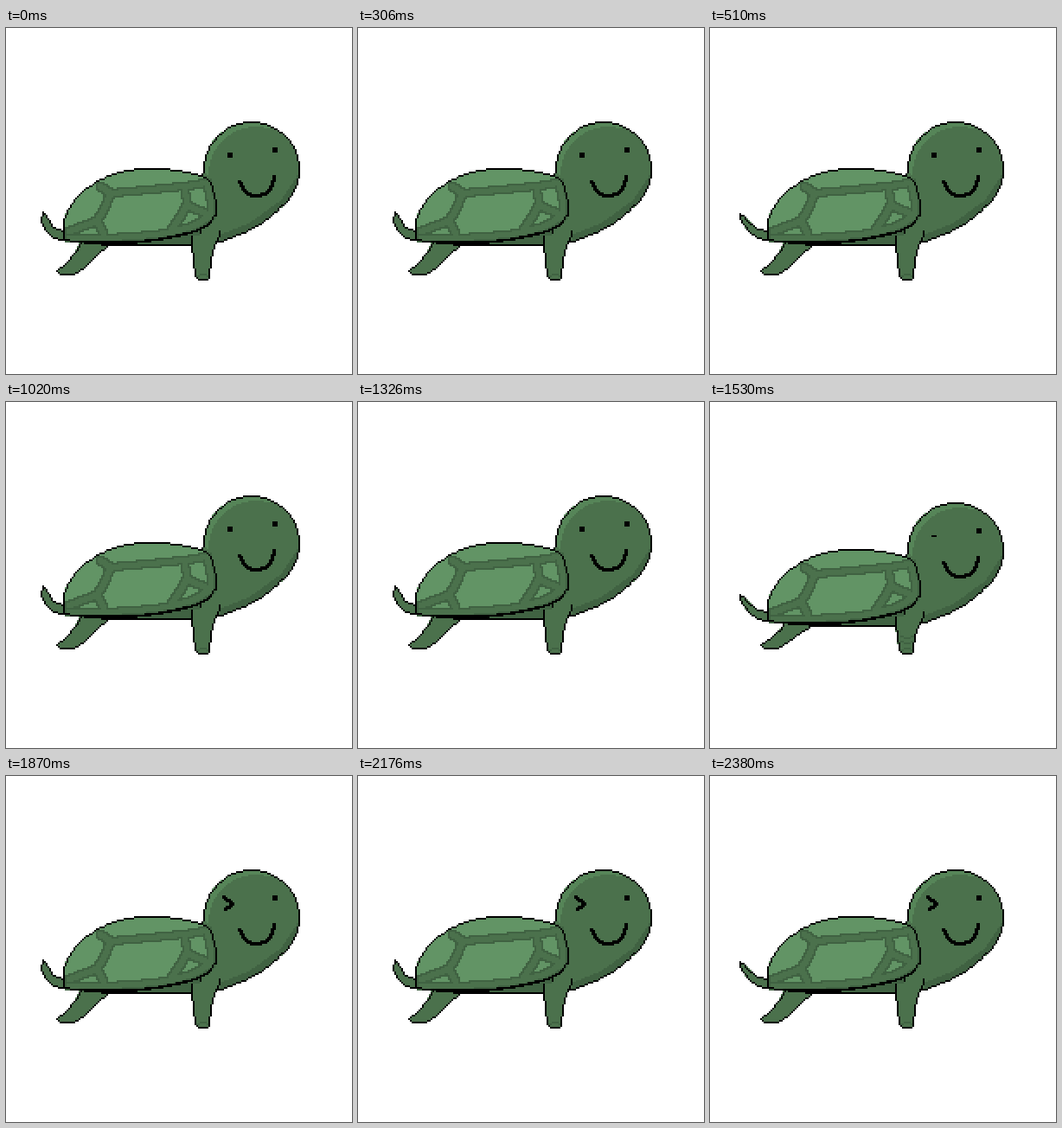
Animation of 400 by 400 pixels, one loop 2.89 s. Source, as an HTML page with a canvas:

```html
<!DOCTYPE html>
<html lang="en">
<head>
<meta charset="utf-8">
<title>Winking turtle</title>
<style>
  html, body { margin: 0; width: 100%; height: 100%; overflow: hidden; background: #fff; }
  canvas { display: block; width: 100vw; height: 100vh; image-rendering: pixelated; }
</style>
</head>
<body>
<canvas id="stage" width="200" height="200"></canvas>
<script>
const ctx = document.getElementById('stage').getContext('2d');
const INK = '#000', SKIN = '#4b714c', SHADE = '#406242', GLOW = '#568558', PLATE = '#629465';
const DROP = 4;

const pts = s => s.split(' ').map(p => p.split(',').map(Number));
const clamp = v => Math.max(0, Math.min(1, v));

function arc(cx, cy, r, from, to) {
  return Array.from({ length: 49 }, (_, i) => {
    const a = from + (to - from) * i / 48;
    return [cx + r * Math.cos(a), cy + r * Math.sin(a)];
  });
}

// Catmull-Rom through the points
function smooth(p, closed) {
  const n = p.length, out = [];
  const at = i => closed ? p[(i + n) % n] : p[Math.max(0, Math.min(n - 1, i))];
  for (let i = 0; i < (closed ? n : n - 1); i++) {
    const [a, b, c, d] = [at(i - 1), at(i), at(i + 1), at(i + 2)];
    for (let t = 0; t < 1; t += 0.125) {
      out.push([0, 1].map(k => b[k] + 0.5 * t * (c[k] - a[k] +
        t * (2 * a[k] - 5 * b[k] + 4 * c[k] - d[k] + t * (3 * (b[k] - c[k]) + d[k] - a[k])))));
    }
  }
  if (!closed) out.push(p[n - 1]);
  return out;
}

function fill(p, color) {
  ctx.fillStyle = color;
  const ys = p.map(q => q[1]);
  for (let y = Math.floor(Math.min(...ys)); y <= Math.max(...ys); y++) {
    const xs = [];
    p.forEach(([x1, y1], i) => {
      const [x2, y2] = p[(i + 1) % p.length], row = y + 0.01;
      if ((y1 <= row) !== (y2 <= row)) xs.push(x1 + (row - y1) * (x2 - x1) / (y2 - y1));
    });
    xs.sort((a, b) => a - b);
    for (let i = 0; i + 1 < xs.length; i += 2) {
      const l = Math.round(xs[i]), r = Math.round(xs[i + 1]);
      ctx.fillRect(l, y, r - l + 1, 1);
    }
  }
}

// Square-brush line without doubled corners
function stroke(p, color = INK, size = 1) {
  const cells = [], inset = (size - 1) >> 1;
  for (let i = 0; i + 1 < p.length; i++) {
    const [[x1, y1], [x2, y2]] = [p[i], p[i + 1]];
    const n = Math.max(1, Math.ceil(Math.max(Math.abs(x2 - x1), Math.abs(y2 - y1))));
    for (let k = 0; k <= n; k++) {
      const c = [Math.round(x1 + (x2 - x1) * k / n), Math.round(y1 + (y2 - y1) * k / n)];
      const last = cells[cells.length - 1], prev = cells[cells.length - 2];
      if (last && last[0] === c[0] && last[1] === c[1]) continue;
      if (prev && Math.abs(prev[0] - c[0]) === 1 && Math.abs(prev[1] - c[1]) === 1) cells.pop();
      cells.push(c);
    }
  }
  ctx.fillStyle = color;
  for (const [x, y] of cells) ctx.fillRect(x - inset, y - inset, size, size);
}

const outline = p => stroke([...p, p[0]]);

function shape(p, color) {
  fill(p, color);
  outline(p);
}

const NECK = pts('148,112 138,117.5 124,123');
const HEAD = [...arc(141.5, 81.5, 27.5, Math.PI, Math.PI * 2.26), ...NECK, ...pts('112,123 112,90')];
const HEAD_GLOW = [...arc(141.5, 81.5, 27.5, Math.PI, Math.PI * 1.6),
                   ...arc(144, 84.5, 28, Math.PI * 1.6, Math.PI)];
const NECK_SHADE = [...arc(141.5, 81.5, 27.5, 0.1, Math.PI * 0.26), ...NECK, ...pts('124,119 141,112 159,99')];
const SHELL = smooth(pts('33,119 34,108 42,96 55,87 70,82 90,81 112,85 118,90 121,104 117,112 104,118 75,123 45,123 34,122'), true);
const BANDS = [
  '54,91 60,95 82,93 103,91 116,89',
  '60,95 56,105 52,111 36,117',
  '52,111 56,119',
  '103,91 104,102 100,109 94,118',
  '104,102 118,108',
  '36,121 56,121 75,120 94,118 108,114 118,108 118,100 116,90'
].map(pts);
const BELLY = pts('55,120 60,125 107,125 120,124 120,112');
const TAIL = pts('21,106 24,110 27,115 33,117 33,122 27,121 22,116 20,111');
const BACK_LEG = pts('43,123 40,129 34,136 29,140 30,142 39,142 45,138 52,131 59,125');
const FRONT_LEG = pts('107,120 107,125 108,135 109,143 111,145 116,145 117,143 118,133 120,125 123,120 123,117');
const SMILE = smooth(pts('134,88 138,94 144,96 151,93 154,85'), false);
const WINK = pts('125,69 130,73 126,76');

// The tip bends most, the root stays put
const swing = amount => TAIL.map(([x, y]) => {
  const w = amount * clamp((118 - y) / 12);
  return [x - 4 * w, y + w];
});

// The top of a leg sinks with the body, the foot stays put
const bend = (leg, low) => leg.map(([x, y]) => [x, y + low * DROP * clamp((138 - y) / 14)]);

const STEPS = [
  { ms: 510, tail: 0, eye: 'open' },
  { ms: 510, tail: 1, eye: 'open' },
  { ms: 510, tail: 0, eye: 'open' },
  { ms: 340, tail: 1, eye: 'shut', low: 1 },
  { ms: 510, tail: 0, eye: 'wink' },
  { ms: 510, tail: 1, eye: 'wink' }
];
const LOOP = STEPS.reduce((sum, s) => sum + s.ms, 0);

function drawHead(eye) {
  fill(HEAD, SKIN);
  fill(HEAD_GLOW, GLOW);
  fill(NECK_SHADE, SHADE);
  outline(HEAD);
  ctx.fillRect(154, 69, 3, 3);
  if (eye === 'open') ctx.fillRect(128, 72, 3, 3);
  if (eye === 'shut') ctx.fillRect(128, 73, 3, 1);
  if (eye === 'wink') stroke(WINK, INK, 2);
  stroke(SMILE, INK, 2);
}

function drawFrontLeg(low) {
  const leg = bend(FRONT_LEG, low);
  fill(leg, SKIN);
  stroke(leg);
  stroke(pts('110,143 112,142 115,142 116,143'), SHADE);
  for (let y = 135; low && y < 140; y += 3) stroke([[110, y], [113, y + 1], [117, y]], SHADE);
}

function drawShell() {
  fill(SHELL.map(([x, y]) => [x, y + 1]), INK);
  fill(SHELL, PLATE);
  BANDS.forEach(b => stroke(b, SHADE, 5));
  BANDS.forEach(b => stroke(b, SKIN, 3));
  outline(SHELL);
}

function draw({ tail, eye, low = 0 }) {
  const lowered = paint => {
    ctx.save();
    ctx.translate(0, low * DROP);
    paint();
    ctx.restore();
  };
  ctx.fillStyle = '#fff';
  ctx.fillRect(0, 0, 200, 200);
  lowered(() => shape(swing(tail), SKIN));
  shape(bend(BACK_LEG, low), SKIN);
  lowered(() => {
    shape(BELLY, SHADE);
    drawHead(eye);
  });
  drawFrontLeg(low);
  lowered(drawShell);
}

let shown;
function tick() {
  let t = performance.now() % LOOP;
  const step = STEPS.find(s => (t -= s.ms) < 0);
  if (step !== shown) draw(shown = step);
  requestAnimationFrame(tick);
}
tick();
</script>
</body>
</html>
```
